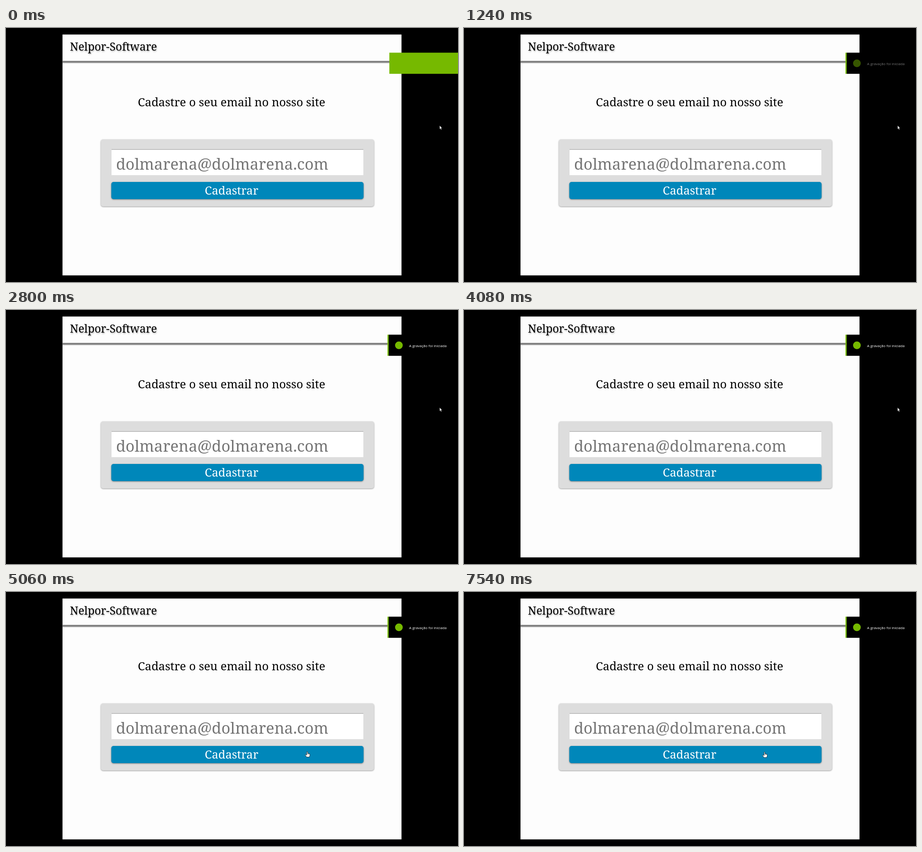
An HTML page with a canvas for the animation above (8000 ms loop, 998x561 px).

```html
<!DOCTYPE html>
<html lang="pt">
<head>
<meta charset="utf-8">
<title>Cadastro</title>
<style>
html, body { margin: 0; width: 100%; height: 100%; overflow: hidden; background: #000; }
canvas { display: block; }
</style>
</head>
<body>
<canvas id="stage" width="998" height="561"></canvas>
<script>
const ctx = document.getElementById('stage').getContext('2d');
const LOOP = 8000;
const GREEN = '#76b900';
const SERIF = '"Noto Serif", serif';
const SANS = '"Open Sans", sans-serif';
const PAGE = [124.75, 14.4, 748.5, 532];

// Pointer hotspot: time, x, y
const PATH = [
  [0, 957, 215], [4080, 957, 215], [4340, 920, 236], [4600, 818, 286],
  [4740, 750, 322], [4880, 691, 349], [4980, 671, 350], [5060, 665, 352],
  [5200, 663, 351], [5340, 664, 352], [6740, 664, 352], [6860, 663, 351],
  [7000, 665, 351], [7160, 665, 350.5], [7300, 665, 350.5], [7540, 663.5, 353],
  [LOOP, 663.5, 353]
];

const clamp = v => Math.max(0, Math.min(1, v));
const progress = (t, from, to) => clamp((t - from) / (to - from));
const easeOut = (u, power) => 1 - Math.pow(1 - u, power);

function rect(x, y, w, h, color) {
  ctx.fillStyle = color;
  ctx.fillRect(x, y, w, h);
}

function roundBox(x, y, w, h, r, color) {
  ctx.fillStyle = color;
  ctx.beginPath();
  ctx.roundRect(x, y, w, h, r);
  ctx.fill();
}

function text(str, x, y, size, family, color, align = 'left') {
  ctx.font = `${size}px ${family}`;
  ctx.textAlign = align;
  ctx.fillStyle = color;
  ctx.fillText(str, x, y);
}

function withShadow(color, blur, dx, dy, draw) {
  ctx.save();
  ctx.shadowColor = color;
  ctx.shadowBlur = blur;
  ctx.shadowOffsetX = dx;
  ctx.shadowOffsetY = dy;
  draw();
  ctx.restore();
}

function drawPage() {
  rect(0, 0, 998, 561, '#000');
  rect(...PAGE, '#fdfdfd');

  withShadow('rgba(0,0,0,.32)', 3, 1, 2, () =>
    text('Nelpor-Software', 141, 50, 24.5, SERIF, '#000'));
  ctx.save();
  ctx.beginPath();
  ctx.rect(...PAGE);
  ctx.clip();
  withShadow('rgba(0,0,0,.4)', 2, 0, 1, () => rect(124, 72.7, 750, 3.5, '#7d7d7d'));
  ctx.restore();

  text('Cadastre o seu email no nosso site', 498, 173, 25.6, SERIF, '#000', 'center');

  withShadow('rgba(0,0,0,.4)', 3, 0, 1, () => roundBox(209.5, 246, 603, 148, 5, '#dddddd'));
  rect(233, 267, 556, 58, '#fff');
  rect(233, 267, 556, 1, '#cfcfcf');
  rect(233, 268, 556, 1, '#acacac');
  text('dolmarena@dolmarena.com', 243, 313, 34.4, SERIF, '#757575');

  withShadow('rgba(0,0,0,.45)', 3, 0, 1, () => roundBox(232.5, 340, 557, 38, 5, '#0087ba'));
  text('Cadastrar', 498, 368, 25.5, SERIF, '#fff', 'center');
}

function drawToast(t) {
  const top = 54.5, height = 46.7;
  const left = t < 20 ? 846.4 : 842.3;
  const cover = 998 - 153 * easeOut(progress(t, 166, 820), 2);
  rect(left, top, cover - left, height, GREEN);
  rect(cover, top, 998 - cover, height, '#000');

  ctx.globalAlpha = easeOut(progress(t, 840, 2220), 1.8);
  ctx.fillStyle = GREEN;
  ctx.beginPath();
  ctx.arc(867.5, 78, 8.5, 0, Math.PI * 2);
  ctx.fill();
  text('A gravação foi iniciada', 890, 81.5, 8, SANS, '#fff');
  ctx.globalAlpha = 1;
}

function pointerAt(t) {
  const i = PATH.findIndex(p => p[0] > t);
  const [t0, x0, y0] = PATH[i - 1];
  const [t1, x1, y1] = PATH[i];
  const u = (t - t0) / (t1 - t0);
  return [x0 + (x1 - x0) * u, y0 + (y1 - y0) * u];
}

function outline(path) {
  const shape = new Path2D(path);
  ctx.fillStyle = '#fff';
  ctx.strokeStyle = '#000';
  ctx.lineWidth = 0.7;
  ctx.lineJoin = 'round';
  ctx.fill(shape);
  ctx.stroke(shape);
}

function drawArrow() {
  outline('M0.3 0V8.8L2.2 7.1L3.6 10.2L5 9.6L3.7 6.6H6.2Z');
}

function drawHand() {
  outline('M-1 1Q0 -.4 1 1V4.6Q2 3.8 2.8 4.9Q3.8 4.3 4.5 5.3Q6 5 6 6.6V8.8L4.8 12.6H-1.2L-4 8.4Q-4.4 6.8 -3 6.8L-1 8.4Z');
  ctx.lineWidth = 0.45;
  ctx.stroke(new Path2D('M1 4.6V7M2.8 4.9V7M4.5 5.3V7'));
}

function drawBeam() {
  ctx.strokeStyle = '#000';
  ctx.lineWidth = 0.8;
  ctx.stroke(new Path2D('M-2 -5H2M0 -5V5M-2 5H2'));
}

function drawPointer(t) {
  const [x, y] = pointerAt(t);
  const inside = (top, bottom) => x > 232 && x < 789 && y > top && y < bottom;
  ctx.save();
  ctx.translate(x, y);
  if (inside(340, 378)) drawHand();
  else if (inside(268, 325)) drawBeam();
  else drawArrow();
  ctx.restore();
}

const start = performance.now();

function frame() {
  const t = (performance.now() - start) % LOOP;
  drawPage();
  drawToast(t);
  drawPointer(t);
  requestAnimationFrame(frame);
}

frame();
</script>
</body>
</html>
```
